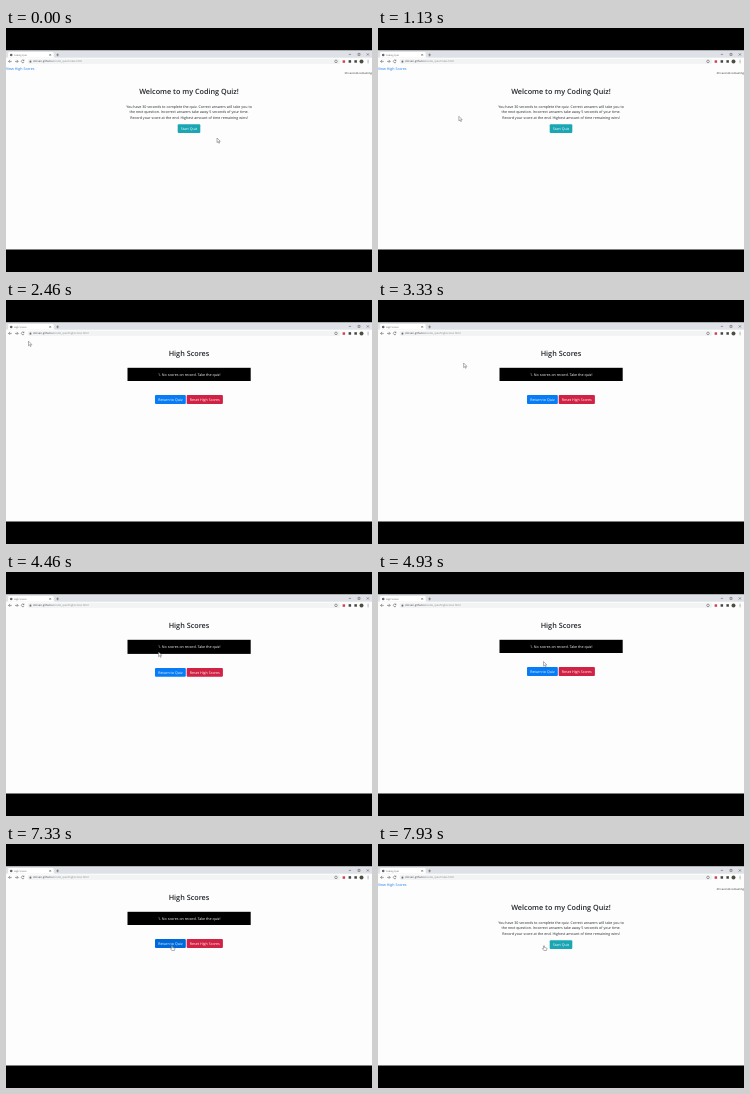
Recreate the animation shown at these times as an HTML page. Size 366x244 px, loop 8 s.

```html
<!DOCTYPE html>
<html lang="en">
<head>
<meta charset="utf-8">
<title>Coding quiz</title>
<style>
html, body { margin: 0; width: 100%; height: 100%; overflow: hidden; background: #000; }
svg { display: block; width: 100vw; height: 100vh; }
text { font: 3.61px "Open Sans", "Noto Sans", sans-serif; fill: #212529; text-rendering: geometricPrecision; }
.mid { text-anchor: middle; }
.title { font-size: 7.25px; font-weight: 600; }
.small { font-size: 2.3px; fill: #555; }
.url { font-size: 2.72px; fill: #888; }
.white { fill: #fff; }
.line { fill: none; stroke: #555; stroke-width: .55; }
</style>
</head>
<body>
<svg viewBox="0 0 366 244">
  <rect width="366" height="244"/>
  <rect y="22.5" width="366" height="199" fill="#fdfdfd"/>

  <!-- browser bar -->
  <rect y="22.5" width="366" height="7.2" fill="#dee1e6"/>
  <path d="M1 29.8Q2.2 29.6 2.2 28V25.2Q2.2 24 3.4 24H46.5Q47.7 24 47.7 25.2V28Q47.7 29.6 49 29.8Z" fill="#fff"/>
  <circle cx="5.2" cy="27" r="1.3" fill="#666"/>
  <text id="tab" class="small" x="8" y="27.8"></text>
  <path class="line" d="M43.3 26l1.8 1.8m0-1.8l-1.8 1.8M50.2 26.9h2.8m-1.4-1.4v2.8M342.8 26.4h2.2M352 25.4h2v2h-2zM360.8 25.4l2.1 2.1m0-2.1l-2.1 2.1"/>
  <rect x="21.5" y="30.7" width="313" height="5.4" rx="2.7" fill="#f1f3f4"/>
  <path class="line" d="M5.8 33.4H2.6m1.5-1.5l-1.5 1.5 1.5 1.5M9 33.4h3.2m-1.5-1.5l1.5 1.5-1.5 1.5M17.9 32.5a1.4 1.4 0 1 0 .2 1.4M18 31.7v1h-1"/>
  <rect x="23.6" y="33" width="1.7" height="1.5" fill="#666"/>
  <path class="line" d="M24 33v-.5a.5.5 0 0 1 .9 0v.5" style="stroke-width:.3"/>
  <text class="url" x="27" y="34.4"><tspan fill="#444">dorvan.github.io</tspan><tspan id="path"></tspan></text>
  <circle class="line" cx="330" cy="33.4" r="1.3"/>
  <rect x="336.6" y="32.3" width="2.5" height="2.5" fill="#d04450"/>
  <rect x="342.6" y="32.2" width="2.5" height="2.5" fill="#444"/>
  <rect x="348.4" y="32.2" width="2.5" height="2.5" fill="#444"/>
  <circle cx="355.5" cy="33.4" r="2" fill="#4a5140"/>
  <path d="M361.7 31.7h.7v.7h-.7zm0 1.4h.7v.7h-.7zm0 1.4h.7v.7h-.7z" fill="#555"/>

  <g id="quiz">
    <text id="link" x="0" y="41.6">View High Scores</text>
    <text x="366" y="45.9" text-anchor="end" style="font-size:2.7px">30 seconds remaining</text>
    <text class="mid title" x="183" y="66">Welcome to my Coding Quiz!</text>
    <g class="mid">
      <text x="183" y="79.5">You have 30 seconds to complete the quiz. Correct answers will take you to</text>
      <text x="183" y="85.3">the next question. Incorrect answers take away 5 seconds of your time.</text>
      <text x="183" y="91.1">Record your score at the end. Highest amount of time remaining wins!</text>
    </g>
    <rect x="171.7" y="96.2" width="22.6" height="8.9" rx="1" fill="#1ba6b4"/>
    <text class="mid white" x="183" y="102">Start Quiz</text>
  </g>

  <g id="scores">
    <text class="mid title" x="183" y="56">High Scores</text>
    <rect id="row" x="121.5" y="67.8" width="123.2" height="13.2"/>
    <text id="entry" class="mid white" x="183.2" y="75.9">1. No scores on record. Take the quiz!</text>
    <g id="buttons">
      <rect id="back" x="149" y="95" width="30.8" height="8.9" rx="1"/>
      <text class="mid white" x="164.4" y="100.8">Return to Quiz</text>
      <rect id="reset" x="180.7" y="95" width="36.2" height="8.9" rx="1"/>
      <text class="mid white" x="198.8" y="100.8">Reset High Scores</text>
    </g>
  </g>

  <g id="cursor" fill="#fff" stroke="#555" stroke-width=".45" stroke-linejoin="round">
    <path id="arrow" d="M0 0V4.6L1.1 3.6 1.9 5.3 2.6 5 1.9 3.3H3.3Z"/>
    <path id="hand" d="M-.5 .4Q0-.4 .5 .4V2L2.7 2.5Q3 2.6 2.9 3.2L2.4 5H-.2L-1.6 3.2Q-1.4 2.4-.5 3Z"/>
  </g>
</svg>
<script>
const LOOP = 8000, OPEN = 2240, RETURN = 7400;
// time, x, y of the pointer tip
const route = [
  [0, 211, 110], [60, 211, 110], [400, 149, 122], [600, 149, 122],
  [860, 92, 97], [1000, 92, 97], [1800, 24, 44], [1930, 22.5, 41.2],
  [2800, 22.5, 41.2], [3330, 85.5, 63], [3600, 118, 72], [4460, 152.5, 80],
  [4930, 165.5, 89.5], [5330, 166, 97], [6200, 166, 101], [6400, 186.5, 101],
  [6930, 166, 101.5], [LOOP, 166, 101.5]
];
const $ = id => document.getElementById(id);
const show = (id, on) => $(id).style.display = on ? "" : "none";
const fill = (id, color) => $(id).style.fill = color;

function pointer(t) {
  const i = route.findIndex(k => k[0] > t);
  const [t0, x0, y0] = route[i - 1], [t1, x1, y1] = route[i];
  const p = (t - t0) / (t1 - t0);
  return [x0 + (x1 - x0) * p, y0 + (y1 - y0) * p];
}

function draw(t) {
  const [x, y] = pointer(t);
  const onScores = t >= OPEN && t < RETURN;
  const over = (l, r, top, bottom) => x >= l && x <= r && y >= top && y <= bottom;
  const onLink = !onScores && over(0, 29, 37, 43);
  const onRow = onScores && over(121.5, 244.7, 67.8, 81);
  const onBack = onScores && over(149, 180.2, 95, 104);
  const onReset = onScores && over(180.2, 217, 95, 104);

  show("quiz", !onScores);
  show("scores", onScores);
  $("tab").textContent = onScores ? "High Scores" : "Coding Quiz";
  $("path").textContent = "/code_quiz/" + (onScores ? "highscores.html" : "index.html");

  fill("link", onLink ? "#0056b3" : "#1479e8");
  $("link").style.textDecoration = onLink ? "underline" : "none";
  $("row").setAttribute("height", onRow ? 14.1 : 13.2);
  $("entry").setAttribute("y", onRow ? 76.3 : 75.9);
  $("buttons").setAttribute("transform", `translate(0 ${onRow ? .9 : 0})`);
  fill("back", onBack ? "#0069d9" : "#087cf5");
  fill("reset", onReset ? "#b9102f" : "#d02245");

  const hand = onLink || onBack || onReset || t >= RETURN;
  show("hand", hand);
  show("arrow", !hand);
  $("cursor").setAttribute("transform", `translate(${x} ${y})`);
}

const start = performance.now();
(function tick() {
  draw((performance.now() - start) % LOOP);
  requestAnimationFrame(tick);
})();
</script>
</body>
</html>
```
